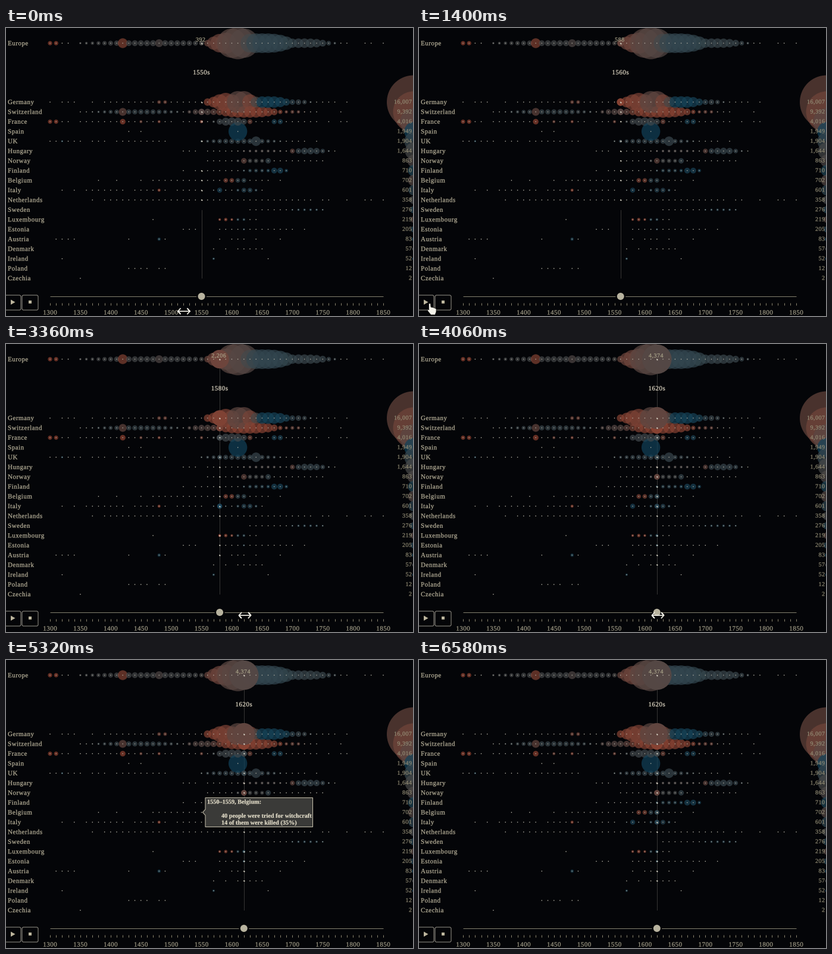
Recreate the animation shown at these times as a matplotlib script. Size 684 by 484 pixels, loop 7.38 s.

```python
import numpy as np
import matplotlib.pyplot as plt
from matplotlib.animation import FuncAnimation
from matplotlib.patches import Circle, FancyBboxPatch, PathPatch, Polygon
from matplotlib.path import Path
from matplotlib.textpath import TextPath

W, H, DPI = 684, 484, 72          # one point equals one pixel
LOOP, TICK, STEP = 7380, 20, 140  # ms
BG = "#040508"
CREAM, TAN, DIM = "#bdb69e", "#a5a08a", "#8c8670"
R_SCALE = 45 / np.sqrt(16007)

fig = plt.figure(figsize=(W / DPI, H / DPI), dpi=DPI, facecolor=BG)
ax = fig.add_axes([0, 0, 1, 1])
ax.set(xlim=(0, W), ylim=(H, 0))
ax.axis("off")


# ---------- text with letter spacing ----------
glyphs = {}


def outline(s, weight):
    return TextPath((0, 0), s, size=100,
                    prop=dict(family="Liberation Serif", weight=weight))


def glyph(c, weight):
    if (c, weight) not in glyphs:
        end = outline("l", weight).get_extents().x1
        adv = outline(c + "l", weight).get_extents().x1 - end
        glyphs[c, weight] = (None if c == " " else outline(c, weight), adv)
    return glyphs[c, weight]


def text_path(s, x, y, size=11, gap=0.5, anchor=0.0, weight="normal"):
    k, pen, placed = size / 100, 0, []
    for c in s:
        shape, adv = glyph(c, weight)
        if shape is not None:
            placed.append((shape, pen))
        pen += adv * k + gap
    x -= anchor * (pen - gap)
    return Path.make_compound_path(*[
        Path(g.vertices * [k, -k] + [x + p, y], g.codes) for g, p in placed])


def add_text(paths, color, z=6):
    return ax.add_patch(PathPatch(Path.make_compound_path(*paths),
                                  fc=color, ec=color, lw=0.2, zorder=z))


# ---------- data: every row is a few bumps over a run of decades ----------
bubbles, names, totals, sums = [], [], [], []


def year_x(year):
    return 74 + (np.asarray(year) - 1300) * 1.0182


def decades(spans):
    for part in spans.split():
        ends = [int(v) for v in part.split("-")]
        yield from range(ends[0], ends[-1] + 1, 10)


def tint(tone):
    """Deadly decades are orange, mild ones blue."""
    stops = np.array([[152, 65, 45], [70, 73, 74], [17, 66, 90]]) / 255
    return np.stack([np.interp(tone, [0, 0.5, 1], stops[:, c])
                     for c in range(3)], axis=-1)


def bump(year, centre, height, tone, width=7):
    return height * np.exp(-abs((year - centre) / width) ** 3), tone


def add_bubbles(y, spans, bumps):
    for year in decades(spans):
        r, tone = np.array([(0.8, 0.5)] + [bump(year, *b) for b in bumps]).T
        bubbles.append((year, y, r.max(), np.average(tone, weights=r ** 3)))


def add_country(name, total, spans, *bumps):
    y = 124.5 + 16.45 * len(sums)
    add_bubbles(y, spans, bumps)
    names.append(text_path(name, 3, y + 3.4))
    totals.append(text_path(f"{total:,}", 682, y + 2.6, 10, anchor=1))
    mean = np.average([b[2] for b in bumps] or [0.5],
                      weights=[b[1] ** 2 for b in bumps] or [1])
    sums.append((685, y, R_SCALE * np.sqrt(total), mean))


# bumps: centre year, radius, tone, width
names.append(text_path("Europe", 3, 29.1))
add_bubbles(25.5, "1300-1330 1350-1790 1820-1830 1850", [
    (1305, 4.1, .05, 10), (1420, 8.2, .05), (1470, 5, .5, 120), (1480, 6.6, .4),
    (1600, 18, .25, 38), (1610, 27, .4, 22), (1650, 16.5, .68, 55),
    (1715, 8, .6, 50)])
add_country("Germany", 16007, "1300 1320-1340 1370 1390-1770 1790",
            (1485, 3.8, .2, 8), (1570, 9, .1, 14), (1590, 15.5, .15, 18),
            (1615, 19, .36, 16), (1630, 13, .08, 14), (1660, 9.8, .95, 38),
            (1705, 4.6, .6, 25))
add_country("Switzerland", 9392, "1350-1740 1780",
            (1445, 4.3, .6, 70), (1420, 6.6, .25), (1560, 5.3, .4, 35),
            (1625, 9.8, .1, 55), (1700, 3, .25, 20))
add_country("France", 4016, "1300-1330 1350-1500 1520-1740 1760 1780-1790",
            (1305, 4, .04, 10), (1420, 4.7, .05), (1450, 2.4, .2),
            (1480, 2.4, .1), (1550, 2.5, .2), (1600, 7, .55, 28),
            (1630, 4, .2), (1675, 4.6, .88, 11))
add_country("Spain", 1949, "1430 1450 1610", (1610, 15.7, 1))
add_country("UK", 1904, "1300-1350 1370-1390 1410-1490 1550-1720 1740",
            (1320, 1.7, .9), (1615, 4.3, .62, 65), (1640, 8, .62))
add_country("Hungary", 1644, "1520-1540 1560-1770",
            (1650, 2.4, .45, 45), (1700, 4, .25), (1728, 5.6, .62, 30))
add_country("Norway", 863, "1560-1750",
            (1635, 3.5, .5, 32), (1620, 4.7, .25), (1660, 4.5, .65))
add_country("Finland", 710, "1520 1540-1690",
            (1640, 3, .75, 25), (1675, 5, .92, 18))
add_country("Belgium", 702, "1380 1410 1450 1470-1660 1680",
            (1595, 4, .15, 13), (1615, 4, .68, 13))
add_country("Italy", 601, "1320 1340 1360-1420 1440-1490 1510-1550 1570-1650",
            (1480, 2.5, .02), (1580, 4.2, .9, 9), (1625, 4, .78, 18))
add_country("Netherlands", 358, "1370 1390-1730 1750-1760 1790 1820-1830 1850")
add_country("Sweden", 276, "1630-1750", (1725, 2.1, .8, 35))
add_country("Luxembourg", 219, "1470 1580-1640",
            (1590, 2.8, .05, 16), (1615, 2.5, .8, 11))
add_country("Estonia", 205, "1520-1540 1580-1700 1720", (1620, 1.7, .8))
add_country("Austria", 83, "1310-1340 1430 1480-1490 1580 1600-1620 1640 1680",
            (1480, 2.7, .9))
add_country("Denmark", 57, "1570 1590 1610-1650")
add_country("Ireland", 52, "1320 1570 1660", (1570, 2, .9))
add_country("Poland", 12, "1430-1460 1480-1490")
add_country("Czechia", 2, "1350")

# upper rows lie over lower ones of the same decade
years, ys, radii, tones = np.array(sorted(bubbles, key=lambda b: (b[0], -b[1]))).T
spots, tints = np.column_stack([year_x(years), ys]), tint(tones)


def discs(xy, r, color, alpha, z):
    return ax.scatter(*np.transpose(xy), s=(2 * np.asarray(r)) ** 2, c=color,
                      alpha=alpha, linewidths=0, zorder=z)


# ---------- chart ----------
sums = np.array(sums)
discs(spots, radii, tints, 0.7, 2)
discs(spots, np.full(len(spots), 0.75), "#c0bcae", 0.95, 4)
discs(sums[:, :2], sums[:, 2], tint(sums[:, 3]), 0.7, 2)
add_text(names, CREAM)
add_text(totals, "#948e76")
add_text([text_path(str(y), year_x(y), 481.5, anchor=0.5)
          for y in range(1300, 1851, 50)], TAN)

# ---------- slider and buttons ----------
ax.vlines(year_x(np.arange(1300, 1851, 10)), 462, 466, color=DIM, lw=1)
ax.hlines(450.5, 74, 634, color="#85816f", lw=1, zorder=5)
for x, w in ((-2, 27), (27, 27)):
    ax.add_patch(FancyBboxPatch((x + 2.5, 451.5), w - 5, 20, fc=BG, ec="#99958a",
                                lw=1, boxstyle="round,pad=2.5,rounding_size=2.5"))
ax.add_patch(Polygon([(8, 456.5), (15.5, 460.7), (8, 465)], fc=CREAM))
ax.add_patch(Polygon([(38, 458), (43, 458), (43, 463), (38, 463)], fc=CREAM))

# ---------- moving parts ----------
needle, = ax.plot([], [], color="#363634", lw=1, zorder=1)
knob = ax.add_patch(Circle((0, 451), 7.2, fc="#b8b39f", ec=BG, lw=2.4, zorder=7))
glow = discs([(0, 0)], [1], "w", None, 3)
sparks = discs([(0, 0)], [1.05], "#e2decf", None, 5)
blank = text_path("0", 0, 0)
title = add_text([blank], "#e4dcc8")
count = add_text([blank], "#aaa48a")

tip = [ax.add_patch(Polygon([(335, 231.5), (515.5, 231.5), (515.5, 280.5),
                             (335, 280.5), (335, 261), (330.5, 256), (335, 251)],
                            fc="#3a3a38", ec="#c8c2ae", lw=1, zorder=8)),
       add_text([text_path(s, x, y, 10.25, 0, weight="bold") for s, x, y in (
           ("1550–1559, Belgium:", 338, 241.5),
           ("40 people were tried for witchcraft", 362, 265),
           ("14 of them were killed (35%)", 362, 276.5))], "#e2dcc8", 9)]

ARROW = np.array([(-6, -4.5), (-10, 0), (-6, 4.5), (-10, 0),
                  (10, 0), (6, -4.5), (10, 0), (6, 4.5)])
HAND = np.array([(-1.5, 0), (1.5, 0), (2, 6), (5, 6.5), (8, 7.5), (11, 9),
                 (11, 14), (9, 19), (2, 19), (-3, 13), (-4, 10), (-2, 10),
                 (-1.5, 11)]) - (4, 9)
arrow, = ax.plot([], [], color="#efede4", lw=1.7, zorder=10)
hand = ax.add_patch(Polygon(HAND, fc="#f4f2ea", ec="black", lw=0.6, zorder=10))

PLAY_T = [1120, 1400, 2100, 2380, 3080, 3360, 3920]
PLAY_YEAR = [1550, 1560, 1560, 1570, 1570, 1580, 1620]
MOUSE_T = [0, 840, 1820, 2380, 2800]
MOUSE_XY = np.array([(299, 476), (22, 472), (22, 472), (312, 478.5), (401.5, 456)])
COUNT_YEAR = [1550, 1560, 1570, 1580, 1610, 1620]
COUNT = [392, 588, 1140, 2206, 5682, 4374]


def draw(n):
    t = n * TICK // STEP * STEP
    pos = np.interp(t, PLAY_T, PLAY_YEAR)
    year = int(pos / 10 + 0.5) * 10
    x = float(year_x(pos))

    knob.center = x, 451
    needle.set_data([x, x], [306 if year < 1570 else 28, 420])
    trials = int(np.interp(year, COUNT_YEAR, COUNT))
    title.set_path(text_path(f"{year}s", x - 0.2, 78, anchor=0.5))
    count.set_path(text_path(f"{trials:,}", x - 1.6, 22.6, 10, anchor=0.5))

    now = years == year
    glow.set_offsets(spots[now])
    glow.set_sizes((2 * radii[now]) ** 2)
    glow.set_facecolors(np.column_stack([tints[now], np.full(now.sum(), 0.95)]))
    sparks.set_offsets(spots[now])

    mouse = [np.interp(t, MOUSE_T, v) for v in MOUSE_XY.T]
    on_button = mouse[0] < 56
    arrow.set_data(*(ARROW + mouse).T)
    arrow.set_visible(not on_button and t < 4200)
    hand.set_xy(HAND + mouse)
    hand.set_visible(on_button)
    for part in tip:
        part.set_visible(5320 <= t < 6580)
    return []


anim = FuncAnimation(fig, draw, frames=LOOP // TICK, interval=TICK,
                     repeat=True, repeat_delay=0)
plt.show()
```
